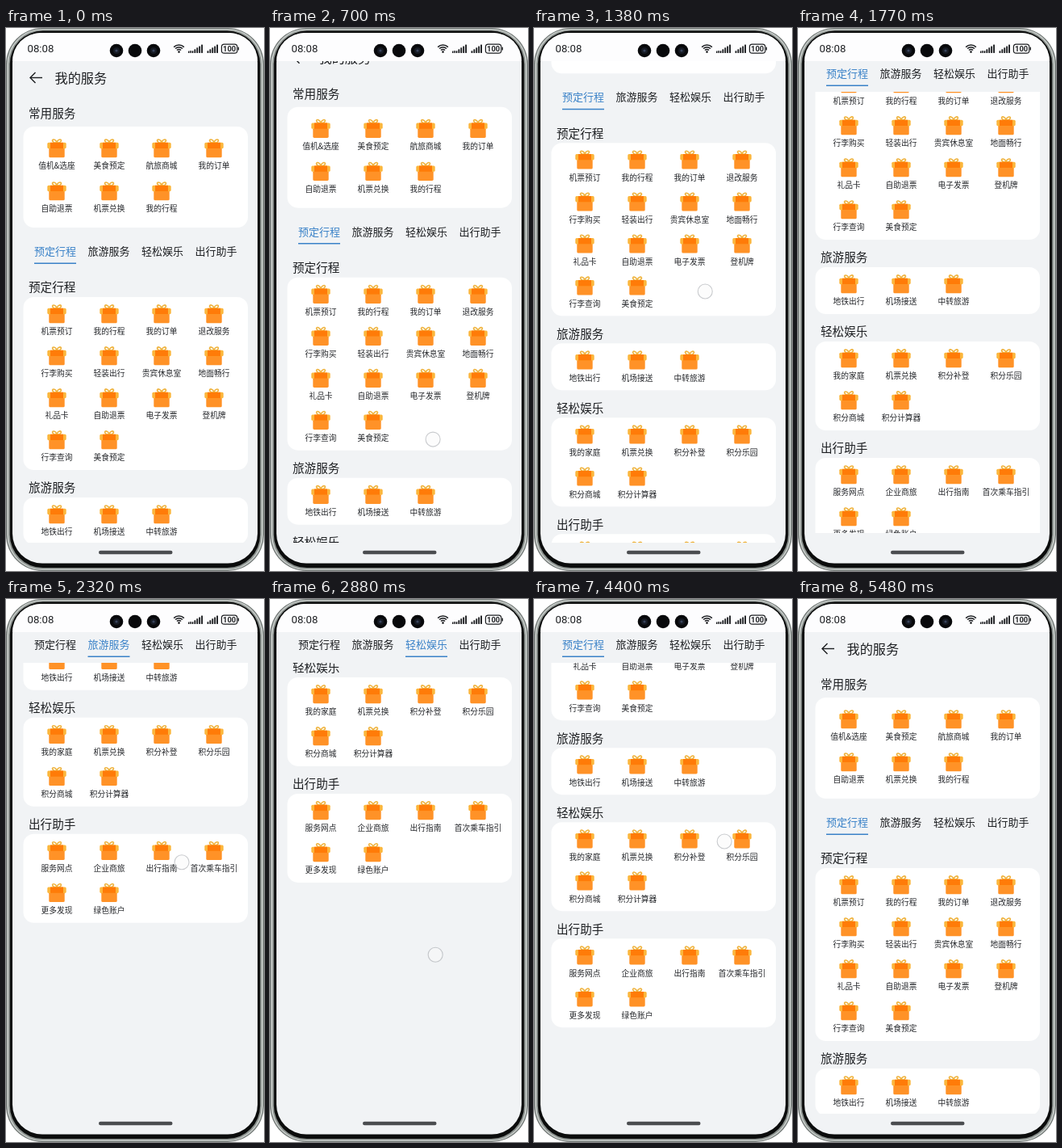
An HTML page with a canvas for the animation above (5550 ms loop, 320 px wide and 672 px high).

```html
<!DOCTYPE html>
<html lang="zh">
<head>
<meta charset="utf-8">
<title>我的服务</title>
<style>
  html, body { margin: 0; width: 100%; height: 100%; overflow: hidden; background: #fff; }
  canvas { display: block; width: 320px; height: 672px; }
</style>
</head>
<body>
<canvas id="stage" width="320" height="672"></canvas>
<script>
const ctx = document.getElementById('stage').getContext('2d');
const LOOP = 5550;
const CJK = '"Noto Sans CJK SC", "Noto Sans SC", "Noto Sans CJK", sans-serif';
const LATIN = 'Roboto, "Open Sans", sans-serif';
const BG = '#f1f3f5', INK = '#1d1f22', BLUE = '#3a82c8';
const COLS = [63, 128, 193, 258];
const STICK = 220;      // outer scroll distance before the tab bar sticks
const VIEW = { top: 41, bottom: 637 };
const LIST = { top: 299, bottom: 845 };

const common = ['值机&选座', '美食预定', '航旅商城', '我的订单', '自助退票', '机票兑换', '我的行程'];
const groups = [
  { name: '预定行程', items: ['机票预订', '我的行程', '我的订单', '退改服务', '行李购买', '轻装出行', '贵宾休息室', '地面畅行',
    '礼品卡', '自助退票', '电子发票', '登机牌', '行李查询', '美食预定'] },
  { name: '旅游服务', items: ['地铁出行', '机场接送', '中转旅游'] },
  { name: '轻松娱乐', items: ['我的家庭', '机票兑换', '积分补登', '积分乐园', '积分商城', '积分计算器'] },
  { name: '出行助手', items: ['服务网点', '企业商旅', '出行指南', '首次乘车指引', '更多发现', '绿色账户'] }
];
let nextTop = 333;
for (const g of groups) {
  g.top = nextTop;
  g.height = 6 + 52 * Math.ceil(g.items.length / 4);
  nextTop += g.height + 34;
}

// [time, scroll]
const scrollKeys = [[0, 0], [420, 0], [1040, 88], [1440, 210], [1600, 262], [1770, 285], [1900, 288], [2110, 288],
  [2320, 526], [2440, 547], [2600, 551], [2700, 551], [3020, 593], [3840, 593], [4080, 430], [4200, 404],
  [4300, 400], [4360, 400], [4400, 397], [4600, 165], [4740, 22], [4810, 0], [LOOP, 0]];

// Each touch: [time, x, y]
const touches = [
  [[140, 196, 591], [350, 196, 591], [1040, 208, 430], [1440, 213, 308]],
  [[2110, 208, 595], [2320, 218, 326], [2440, 219, 300]],
  [[2670, 200, 501], [3160, 212, 360]],
  [[3850, 226, 270], [4130, 230, 473]],
  [[4340, 235, 290], [4400, 236, 299], [4600, 268, 510], [4800, 298, 637]]
];

// Monotone cubic through the scroll keys
function scrollAt(t) {
  const k = scrollKeys;
  const slope = i => (k[i + 1][1] - k[i][1]) / (k[i + 1][0] - k[i][0]);
  const tangent = i => {
    if (i === 0 || i === k.length - 1) return 0;
    const a = slope(i - 1), b = slope(i);
    return a * b <= 0 ? 0 : 2 * a * b / (a + b);
  };
  let i = 0;
  while (i < k.length - 2 && t >= k[i + 1][0]) i++;
  const h = k[i + 1][0] - k[i][0], u = (t - k[i][0]) / h, v = 1 - u;
  return (1 + 2 * u) * v * v * k[i][1] + u * v * v * h * tangent(i)
    + u * u * (3 - 2 * u) * k[i + 1][1] - u * u * v * h * tangent(i + 1);
}

function touchAt(t) {
  const path = touches.find(p => t >= p[0][0] && t < p[p.length - 1][0]);
  if (!path) return null;
  const i = path.findIndex((p, n) => t < path[n + 1][0]);
  const a = path[i], b = path[i + 1], u = (t - a[0]) / (b[0] - a[0]);
  return [a[1] + (b[1] - a[1]) * u, a[2] + (b[2] - a[2]) * u];
}

function box(x, y, w, h, r, color) {
  ctx.fillStyle = color;
  ctx.beginPath();
  ctx.roundRect(x, y, w, h, r);
  ctx.fill();
}

function disc(x, y, r, color) {
  ctx.fillStyle = color;
  ctx.beginPath();
  ctx.arc(x, y, r, 0, Math.PI * 2);
  ctx.fill();
}

function line(points, color, width) {
  ctx.strokeStyle = color;
  ctx.lineWidth = width;
  ctx.beginPath();
  points.forEach(p => ctx.lineTo(p[0], p[1]));
  ctx.stroke();
}

// Text centred vertically on cy
function text(str, x, cy, size, weight, color, align = 'left', family = CJK) {
  ctx.font = `${weight} ${size}px ${family}`;
  ctx.textAlign = align;
  ctx.fillStyle = color;
  ctx.fillText(str, x, cy + size * 0.375);
}

function clipped(top, bottom, draw) {
  ctx.save();
  ctx.beginPath();
  ctx.rect(8, top, 304, Math.max(0, bottom - top));
  ctx.clip();
  draw();
  ctx.restore();
}

function gift(x, y) {
  ctx.strokeStyle = '#efb440';
  ctx.lineWidth = 1.6;
  for (const side of [-1, 1]) {
    ctx.beginPath();
    ctx.ellipse(x + side * 3, y - 9, 2.7, 1.6, side * -0.6, 0, Math.PI * 2);
    ctx.stroke();
  }
  box(x - 9.7, y - 1, 19.4, 12.3, 1.6, '#ff9227');
  box(x - 11.7, y - 7.2, 23.4, 7.4, 1.6, '#fbb63c');
  box(x - 8, y - 7.2, 16, 7.4, 0, '#ff7b08');
}

function grid(items, iconY, pitch) {
  items.forEach((name, i) => {
    const x = COLS[i % 4], y = iconY + Math.floor(i / 4) * pitch;
    gift(x, y);
    text(name, x, y + 21.8, 9.75, 400, '#24262a', 'center');
  });
}

function drawTop(s) {
  const y = -Math.min(s, STICK);
  line([[45, 61.5 + y], [30, 61.5 + y]], INK, 1.4);
  line([[36.5, 55 + y], [30, 61.5 + y], [36.5, 68 + y]], INK, 1.4);
  text('我的服务', 60.5, 61.5 + y, 16.2, 500, INK);
  text('常用服务', 28, 106 + y, 14.6, 500, INK);
  box(21.5, 122 + y, 278.5, 125, 13, '#fff');
  grid(common, 149 + y, 53);
}

function drawTabs(s) {
  const y = 276 - Math.min(s, STICK);
  const active = s >= 570 ? 2 : s >= 478 ? 1 : 0;
  groups.forEach((g, i) => {
    const x = 61 + i * 66.5;
    text(g.name, x, y, 13, 500, i === active ? BLUE : INK, 'center');
    if (i === active) box(x - 26, y + 14.4, 52, 1.5, 0, BLUE);
  });
}

function drawList(s) {
  for (const g of groups) {
    const y = g.top - s;
    text(g.name, 28, y - 12, 14.6, 500, INK);
    box(21.5, y, 278.5, g.height, 13, '#fff');
    grid(g.items, y + 21, 52);
  }
}

function bars(x, count, h) {
  for (let i = 0; i < count; i++) {
    const b = h * (i + 1.5) / (count + 0.5);
    box(x + i * 2.9, 31 - b, 1.9, b, 0.4, INK);
  }
}

function drawStatus() {
  box(8, 6, 304, 35, [36, 36, 0, 0], '#fdfdfe');
  text('08:08', 26.5, 25.5, 13.2, 400, INK, 'left', LATIN);
  for (const x of [137, 160, 183]) disc(x, 28, 8.3, '#08090b');
  for (const x of [137, 183]) {
    disc(x, 28, 4, '#171b24');
    disc(x, 28, 1.6, '#39445c');
  }
  ctx.strokeStyle = INK;
  ctx.lineWidth = 1.5;
  for (const r of [3.6, 6.3, 9]) {
    ctx.beginPath();
    ctx.arc(214.5, 30, r, -Math.PI * 0.75, -Math.PI * 0.25);
    ctx.stroke();
  }
  disc(214.5, 29.6, 1.3, INK);
  box(226, 28.5, 1.4, 2.5, 0, INK);
  box(228.2, 28, 1.4, 3, 0, INK);
  bars(230.5, 5, 10.5);
  bars(249.5, 5, 10.5);
  ctx.strokeStyle = INK;
  ctx.lineWidth = 1.2;
  ctx.beginPath();
  ctx.roundRect(267.4, 20.1, 19.4, 11, 3.2);
  ctx.stroke();
  box(287.6, 23.6, 1.4, 4, 0.6, INK);
  text('100', 277.1, 25.7, 9.4, 700, INK, 'center', LATIN);
}

function drawPhone() {
  ctx.fillStyle = '#fff';
  ctx.fillRect(0, 0, 320, 672);
  box(0, 0, 320, 672, 45, '#6d7371');
  box(1.2, 1, 317.6, 670, 44, '#c5cac7');
  box(3.2, 2.4, 313.6, 667.2, 42, '#8a908d');
  box(4.8, 3.6, 310.4, 664.4, 41, '#0b0c0c');
  box(8, 6, 304, 656.5, 37, BG);
}

function drawTouch(t) {
  const p = touchAt(t);
  if (!p) return;
  disc(p[0], p[1], 9, 'rgba(250,250,250,0.5)');
  ctx.strokeStyle = 'rgba(150,154,160,0.5)';
  ctx.lineWidth = 1.1;
  ctx.stroke();
}

function render(t) {
  const s = scrollAt(t), outer = Math.min(s, STICK);
  drawPhone();
  clipped(VIEW.top, VIEW.bottom, () => {
    drawTop(s);
    drawTabs(s);
  });
  clipped(Math.max(VIEW.top, LIST.top - outer), Math.min(VIEW.bottom, LIST.bottom - outer), () => drawList(s));
  drawStatus();
  box(115, 646.8, 91.5, 4.4, 2.2, '#4b4d50');
  drawTouch(t);
}

const start = performance.now();
function tick() {
  render((performance.now() - start) % LOOP);
  requestAnimationFrame(tick);
}
tick();
</script>
</body>
</html>
```
